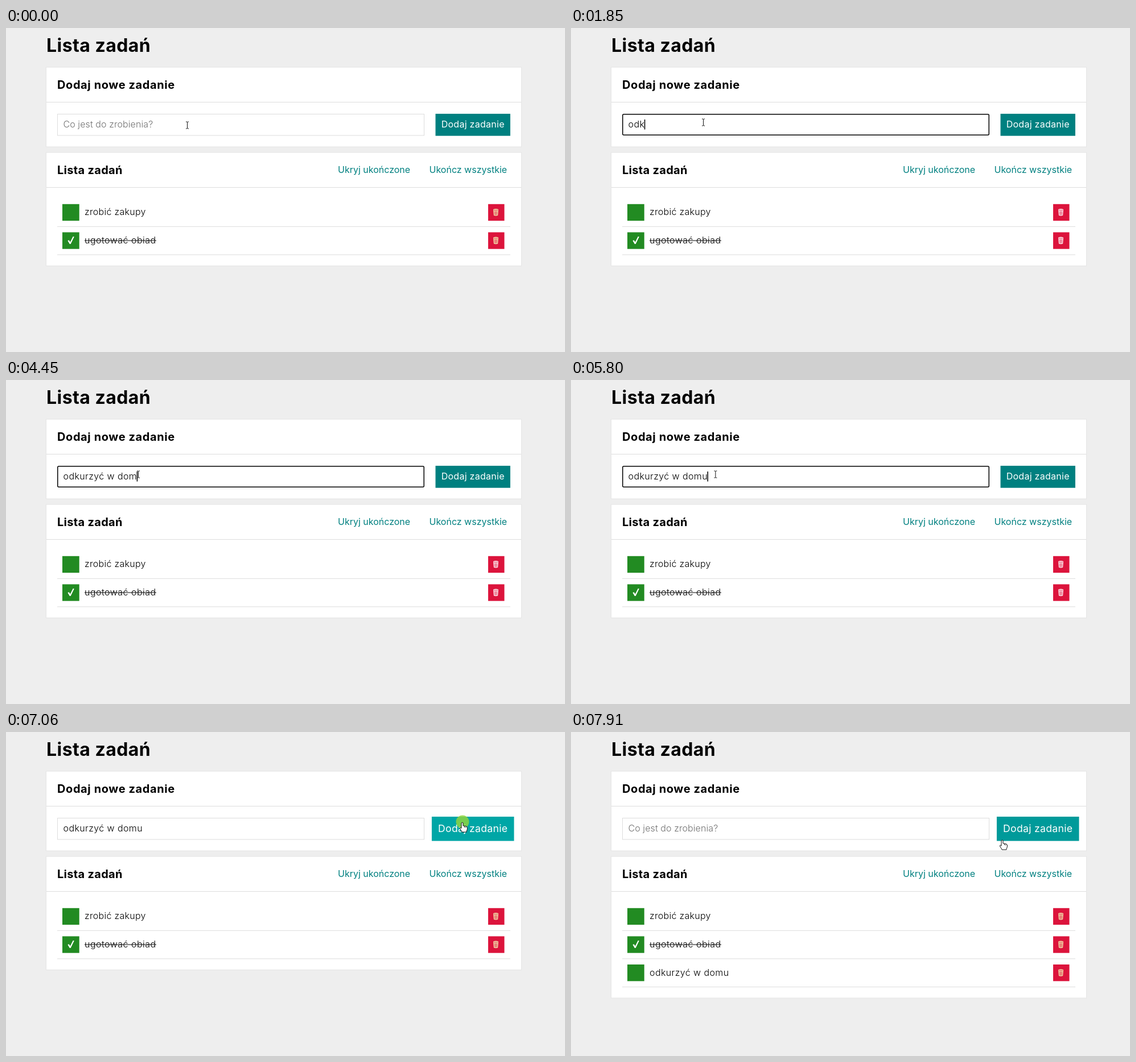
Recreate the animation shown at these times as an HTML page. Size 982 px wide and 570 px high, loop 7990 ms.

```html
<!DOCTYPE html>
<html lang="pl">
<head>
<meta charset="utf-8">
<title>Lista zadań</title>
<style>
html, body { margin: 0; width: 100%; height: 100%; overflow: hidden; background: #eee; }
svg { display: block; width: 982px; height: 570px; }
text { font: 400 16px Inter, "Open Sans", sans-serif; white-space: pre; }
.title { font-size: 32px; font-weight: 700; letter-spacing: .014em; }
.head { font-size: 20px; font-weight: 700; }
.link { fill: #008080; }
.item { font-weight: 300; }
.field { font-weight: 300; letter-spacing: .025em; }
.hint { font-weight: 300; fill: #707070; letter-spacing: .005em; }
.label { fill: #fff; letter-spacing: .017em; }
</style>
</head>
<body>
<svg id="stage" viewBox="0 0 982 570" xmlns="http://www.w3.org/2000/svg"></svg>
<script>
const LOOP = 7990;
const stage = document.getElementById('stage');

function add(tag, attrs = {}, parent = stage, content = '') {
  const el = document.createElementNS('http://www.w3.org/2000/svg', tag);
  for (const key in attrs) el.setAttribute(key, attrs[key]);
  el.textContent = content;
  parent.appendChild(el);
  return el;
}
const set = (el, attrs) => { for (const key in attrs) el.setAttribute(key, attrs[key]); };
const show = (el, on) => el.setAttribute('visibility', on ? 'visible' : 'hidden');
const rect = (x, y, width, height, fill, parent) => add('rect', { x, y, width, height, fill }, parent);
const text = (x, y, cls, content, parent) => add('text', { x, y, class: cls }, parent, content);
const move = (el, x, y) => el.setAttribute('transform', `translate(${x} ${y})`);

function card(y, height, heading, track) {
  const box = rect(70.5, y, 835, height, '#fff');
  set(box, { stroke: '#e5e5e5', 'stroke-width': 1 });
  rect(71, y + 61, 834, 1, '#ddd');
  text(90, y + 37.5, 'head', heading).style.letterSpacing = track + 'em';
  return box;
}

const bins = [];
function task(index, label, track, done) {
  const g = add('g');
  move(g, 0, 309.8 + index * 49.6);
  rect(99, 0, 29.7, 29.3, '#228b22', g);
  text(138, 19.7, 'item', label, g).style.letterSpacing = track + 'em';
  if (done) {
    rect(138, 14.1, 126, 1, '#000', g);
    add('path', { d: 'M108.4 14.6L110.6 13.8L112.8 17L117.8 7.4L119.8 7.8L113.6 20.6H111.8Z', fill: '#fff' }, g);
  }
  rect(847, 0, 28.5, 29.3, '#dc143c', g);
  const bin = add('g', {}, g);
  move(bin, -.5, 0);
  add('path', { d: 'M856.5 9.2Q861 7.2 865.5 9.2L864.6 20Q861 21.6 857.4 20Z' }, bin);
  add('path', { d: 'M857.5 10.7H864.5M859.2 12.5V19M861 12.5V19.5M862.8 12.5V19', stroke: '#dc143c', 'stroke-width': .7, fill: 'none' }, bin);
  bins.push(bin);
  rect(90, 39, 796, 1, '#ddd', g);
  return g;
}

rect(0, 0, 982, 570, '#eee');
text(71, 41.5, 'title', 'Lista zadań');
card(69, 140, 'Dodaj nowe zadanie', .03);
const listCard = card(219, 199.5, 'Lista zadań', .015);
text(583, 254.5, 'link', 'Ukryj ukończone');
text(743.5, 254.5, 'link', 'Ukończ wszystkie');
task(0, 'zrobić zakupy', .018, false);
task(1, 'ugotować obiad', .03, true);
const newTask = task(2, 'odkurzyć w domu', .025, false);

const field = add('rect', { fill: '#fff' });
const hint = text(100.5, 175, 'hint', 'Co jest do zrobienia?');
const typed = text(100.5, 175, 'field', '');
const caret = rect(0, 161, 1.5, 17.5, '#000');

const button = add('g');
const face = rect(-65.7, -19.4, 131.4, 38.8, '#008080', button);
set(text(0, 4.9, 'label', 'Dodaj zadanie', button), { 'text-anchor': 'middle' });

const ring = add('circle', { cx: 802, cy: 158, r: 11.5, fill: '#92d63c', 'fill-opacity': .82 });
const beam = add('path', { d: 'M-2.5 -6H-.7L0 -5.3L.7 -6H2.5M0 -5.5V5.5M-2.5 6H-.7L0 5.3L.7 6H2.5', stroke: '#111', fill: 'none' });
const arrow = add('path', { d: 'M0 0V15L3.6 11.8L6 17.2L8.3 16.2L6 11H11Z', fill: '#fff', stroke: '#111' });
const hand = add('path', {
  d: 'M-1.5 1Q0 -.6 1.5 1V6Q5.5 6 8 7.5Q9 8.2 9 10Q9 13 7.5 15.6V17H-.5Q-1.5 14.5 -4 11Q-4.6 9.4 -3 9.1L-1.5 10.4ZM4 7V9M6.4 7.5V9.5',
  fill: '#fff', stroke: '#111', 'stroke-linejoin': 'round'
});

// Each entry: time and the number of characters in the field from then on.
const PHRASE = 'odkurzyć w domu'.replace(/ /g, '\u00a0');
const KEYS = [[1470, 1], [1720, 2], [1850, 3], [2220, 4], [2620, 5], [2750, 6], [3070, 7],
  [3440, 8], [3700, 9], [4000, 10], [4340, 12], [4450, 14], [4650, 15]];
const FOCUS = 470, PRESS = 6980, ADDED = 7190;
const CARET_OFF = [[1140, 1470], [5200, 5730], [6290, PRESS]];

// Progress from 0 to 1 in n equal jumps, the first at a and the last at b.
function jumps(t, a, b, n) {
  if (t < a) return 0;
  return Math.min(n, Math.floor((t - a) / (b - a) * (n - 1) + 1e-6) + 1) / n;
}
const mix = (a, b, p) => a + (b - a) * p;
const clamp = v => Math.max(0, Math.min(1, v));

function drawField(t) {
  const focused = t >= FOCUS && t < PRESS;
  set(field, focused
    ? { x: 90.75, y: 151.75, width: 643.5, height: 36.5, rx: 2, stroke: '#000', 'stroke-width': 1.5 }
    : { x: 90.5, y: 151.5, width: 644, height: 37.5, rx: 0, stroke: '#ddd', 'stroke-width': 1 });
  let count = 0;
  if (t < ADDED) for (const [time, n] of KEYS) if (t >= time) count = n;
  typed.textContent = PHRASE.slice(0, count);
  show(hint, !count);
  show(caret, focused && !CARET_OFF.some(([a, b]) => t >= a && t < b));
  caret.setAttribute('x', 100 + (count ? typed.getComputedTextLength() : 0));
  for (const bin of bins) bin.setAttribute('fill', focused ? '#fbdde2' : '#f0d2a4');
}

function drawButton(t) {
  const tick = 6630 + Math.floor((t - 6630) / 70) * 70;
  const p = t < 6630 ? 0 : clamp((tick - 6580) / 300);
  const hover = p * p * (3 - 2 * p);
  const press = clamp((tick - PRESS + 70) / 140) * (1 - clamp((tick - ADDED) / 160));
  const level = Math.round(128 * (1 + .2 * hover + .1 * press));
  face.setAttribute('fill', `rgb(0,${level},${level})`);
  button.setAttribute('transform', `translate(820.2 170.3) scale(${1 + .1 * hover})`);
}

function drawPointer(t) {
  const glide = jumps(t, 5800, 6550, 12) ** 1.28;
  const x = mix(232.5, 747, glide);
  const onHand = t >= 6630;
  show(beam, !onHand && x < 736);
  show(arrow, !onHand && x >= 736);
  show(hand, onHand);
  show(ring, t >= PRESS && t < ADDED);
  if (t < 70) move(beam, 318.5, 171);
  else move(beam, x, mix(166, 156, glide ** 2));
  move(arrow, x, 153);
  const reach = jumps(t, 6630, 6910, 5) ** .7;
  const leave = jumps(t, 7680, 7910, 4);
  move(hand, mix(mix(747, 801.5, reach), 757.5, leave), mix(mix(153, 159, reach), 190, leave));
}

function draw(t) {
  drawField(t);
  drawButton(t);
  drawPointer(t);
  show(newTask, t >= ADDED);
  listCard.setAttribute('height', t >= ADDED ? 249 : 199.5);
}

const start = performance.now();
function frame() {
  draw((performance.now() - start) % LOOP);
  requestAnimationFrame(frame);
}
frame();
</script>
</body>
</html>
```
